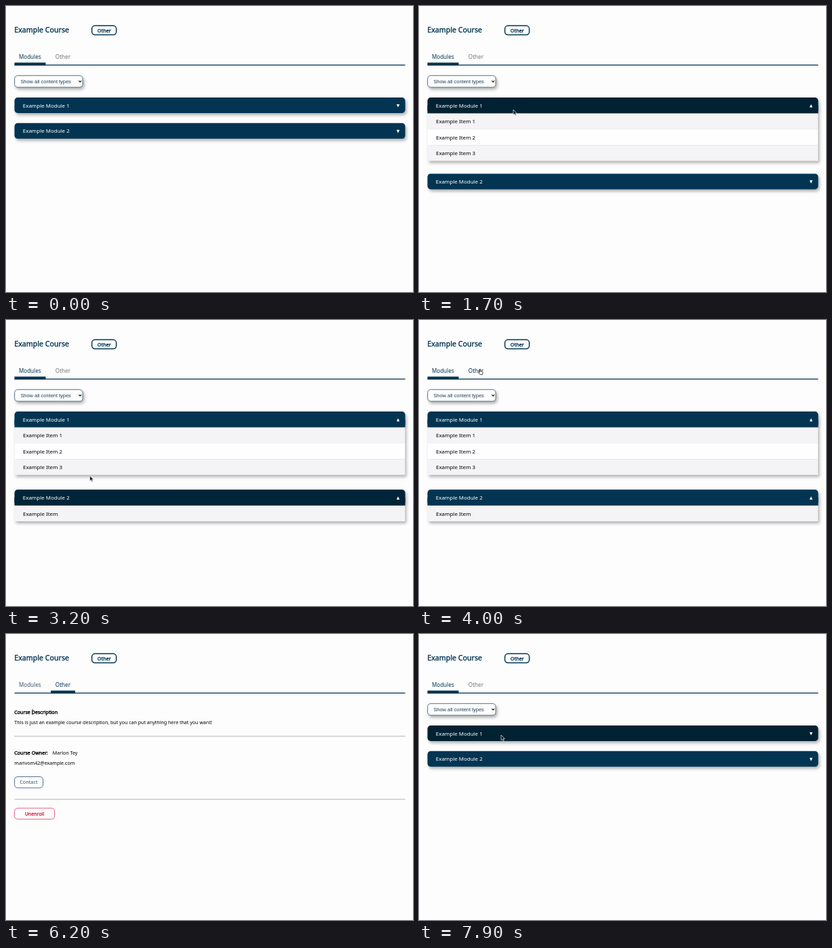
An HTML page for the animation above (8 s loop, 600 px wide and 422 px high).

```html
<!DOCTYPE html>
<html lang="en">
<head>
<meta charset="utf-8">
<title>Example Course</title>
<style>
  html, body { margin: 0; width: 100%; height: 100%; overflow: hidden; background: #fdfdfe; }
  svg { display: block; }
  text { font-family: "Noto Sans", "Open Sans", sans-serif; white-space: pre; }
  .bold { stroke: currentColor; stroke-width: .35px; }
  .shadow { filter: drop-shadow(2px 3.5px 2px rgba(0, 0, 0, .3)); }
</style>
</head>
<body>
<svg id="stage" width="600" height="422" viewBox="0 0 600 422"></svg>
<script>
const NAVY = '#033552', GREY = '#74797d', LOOP = 8000;
const $ = id => document.getElementById(id);

const text = (x, y, size, str, color = '#000', extra = '') =>
  `<text x="${x}" y="${y}" font-size="${size}" fill="${color}" color="${color}" ${extra}>${str}</text>`;
const bold = (x, y, size, str, color, extra = '') =>
  text(x, y, size, str, color, `class="bold" ${extra}`);
const rect = (x, y, w, h, fill, extra = '') =>
  `<rect x="${x}" y="${y}" width="${w}" height="${h}" fill="${fill}" ${extra}/>`;
const outline = (x, y, w, h, color, line = 1) =>
  rect(x, y, w, h, '#fefefe', `rx="4.5" stroke="${color}" stroke-width="${line}"`);

const ROW = 23.45;
function moduleBox(id, title, items) {
  const rows = items.map((name, i) =>
    rect(0, i * ROW, 576, ROW, i % 2 ? '#fefdff' : '#f4f3f5') +
    text(12.5, i * ROW + 15, 7.95, name)).join('');
  return `<g id="${id}" class="shadow">
    <g id="${id}Head">${rect(12.5, 0, 576, 23, 'inherit', 'rx="4.7" style="fill:inherit"')}
    ${rect(12.5, 12, 576, 11.4, NAVY, `id="${id}Foot" style="fill:inherit"`)}</g>
    <svg id="${id}List" x="12.5" y="23.4" width="576" height="0" overflow="hidden">${rows}</svg>
    ${text(24.8, 14.7, 7.95, title, '#fff')}
    <path id="${id}Mark" fill="#fff"/></g>`;
}

$('stage').innerHTML =
  bold(12.3, 38.7, 10.65, 'Example Course', NAVY) +
  outline(126.6, 29.1, 36, 13.4, NAVY, 1.5) +
  bold(144.8, 38.6, 7.3, 'Other', NAVY, 'text-anchor="middle"') +
  text(19, 77.5, 8.05, 'Modules', NAVY, 'id="tabModules"') +
  text(72.8, 77.5, 8.15, 'Other', NAVY, 'id="tabOther"') +
  rect(12.5, 86.5, 576, 1.3, NAVY) +
  rect(12.5, 83.5, 46, 4, NAVY, 'id="underline"') +
  `<g id="pageModules">
    <g class="shadow">${outline(12.7, 102.7, 100.4, 17.2, '#3f6874', .9)}</g>
    ${text(21.4, 114, 7.45, 'Show all content types', '#1c3d5a',
      `style="font-family:'Liberation Sans',Arial,sans-serif"`)}
    <path d="M107.3 110.2l1.9 1.9 1.9-1.9" fill="none" stroke="#111" stroke-width="1.1"/>
    ${moduleBox('one', 'Example Module 1', ['Example Item 1', 'Example Item 2', 'Example Item 3'])}
    ${moduleBox('two', 'Example Module 2', ['Example Item'])}
  </g>
  <g id="pageOther">
    ${bold(12.3, 117.5, 7.13, 'Course Description')}
    ${text(12.3, 133.3, 7.07, 'This is just an example course description, but you can put anything here that you want!')}
    ${rect(12.5, 150.4, 576, 1, '#b3b3b5')}
    ${bold(12.3, 177.6, 7.1, 'Course Owner:')}
    ${text(68.8, 177.6, 7.1, 'Marlon Tey')}
    ${text(12.3, 193.4, 7.1, 'marivom42@example.com')}
    ${outline(12.6, 210.6, 42, 16.4, '#3f5f82', .9)}
    ${text(33.4, 221.4, 7.3, 'Contact', '#2f4d70', 'text-anchor="middle"')}
    ${rect(12.5, 243.4, 576, 1, '#b3b3b5')}
    ${outline(12.6, 257, 59, 16.2, '#e84a6c', .9)}
    ${bold(42, 267.8, 7.1, 'Unenroll', '#dd2850', 'text-anchor="middle"')}
  </g>
  <g id="cursor">
    <path id="arrow" d="M0 0V7.6L1.8 6 3 8.6 4.3 8 3.1 5.5H5.4Z" fill="#15191c" stroke="#e4e6e8" stroke-width=".7"/>
    <path id="hand" d="M.3-.3Q1-1.2 1.6-.3V2.6L4.6 3.2Q5.3 3.5 5.1 4.5L4.5 7.6H1L-1.2 4.6Q-1.2 3.6-.2 4L.3 4.5Z" fill="#fff" stroke="#222" stroke-width=".8"/>
    <path id="beam" d="M-1-3.8H1M0-3.8V3.8M-1 3.8H1" fill="none" stroke="#444" stroke-width=".7"/>
  </g>`;

// Pointer path: time, x, y
const path = [
  [100, 165, 13], [900, 141, 122], [1200, 139, 153], [1800, 139, 153],
  [2300, 130, 259], [3000, 130, 259], [3800, 89, 73], [5200, 89, 73],
  [5800, 45, 262], [6000, 56, 249], [6200, 39, 115], [6400, 35, 73],
  [7100, 35, 73], [7700, 123, 147], [7900, 121, 149]
];

const clamp = v => Math.min(1, Math.max(0, v));
const ramp = (t, start, length) => clamp((t - start) / length);
const smooth = p => p * p * (3 - 2 * p);
const easeOut = p => 1 - (1 - p) ** 3;
const between = (t, a, b) => t >= a && t < b;
const hover = (t, enter, leave) => ramp(t, enter, 300) - ramp(t, leave, 300);
const mix = (a, b, p) => `color-mix(in srgb, ${b} ${p * 100}%, ${a})`;
const show = (id, on) => $(id).style.display = on ? '' : 'none';

function pointer(t) {
  const i = path.findIndex(k => k[0] > t);
  if (i < 0) return path.at(-1).slice(1);
  if (!i) return path[0].slice(1);
  const [t0, x0, y0] = path[i - 1], [t1, x1, y1] = path[i];
  const p = smooth(ramp(t, t0, t1 - t0));
  return [x0 + (x1 - x0) * p, y0 + (y1 - y0) * p];
}

function drawModule(id, y, height, open, dark) {
  $(id).setAttribute('transform', `translate(0 ${y})`);
  $(id + 'Head').style.fill = mix(NAVY, '#012233', dark);
  $(id + 'List').setAttribute('height', height);
  show(id + 'List', height > 0);
  show(id + 'Foot', open);
  $(id + 'Mark').setAttribute('d', open ? 'M575.8 14.6h4.4l-2.2-4.7z' : 'M575.8 9.9h4.4l-2.2 4.7z');
}

function draw(t) {
  const other = between(t, 4400, 7100), reset = t >= 7100;
  show('pageOther', other);
  show('pageModules', !other);
  $('underline').setAttribute('x', other ? 66 : 12.5);
  $('underline').setAttribute('width', other ? 36 : 46);
  $('tabModules').style.fill = other ? mix(GREY, NAVY, ramp(t, 6050, 300)) : NAVY;
  $('tabOther').style.fill = other ? NAVY : mix(GREY, NAVY, hover(t, 3700, 7100));

  const first = reset ? 0 : easeOut(ramp(t, 1500, 300));
  const second = reset ? 0 : easeOut(ramp(t, 2750, 250));
  const drop = 77.5 * first;
  drawModule('one', 135, Math.min(drop, 3 * ROW), first > 0,
    hover(t, 1000, 1950) + ramp(t, 7450, 300));
  drawModule('two', 172.8 + drop, ROW * second, second > 0, hover(t, 2200, 3150));

  const hand = between(t, 3700, 5300) || between(t, 5700, 5900) || between(t, 6350, 7200);
  const beam = between(t, 5400, 5600) || between(t, 6100, 6350);
  show('cursor', t >= 100);
  show('hand', hand);
  show('beam', beam);
  show('arrow', !hand && !beam);
  $('cursor').setAttribute('transform', `translate(${pointer(t)})`);
}

const begin = performance.now();
function tick() {
  draw(Math.floor((performance.now() - begin) % LOOP / 100) * 100);
  requestAnimationFrame(tick);
}
tick();
</script>
</body>
</html>
```
